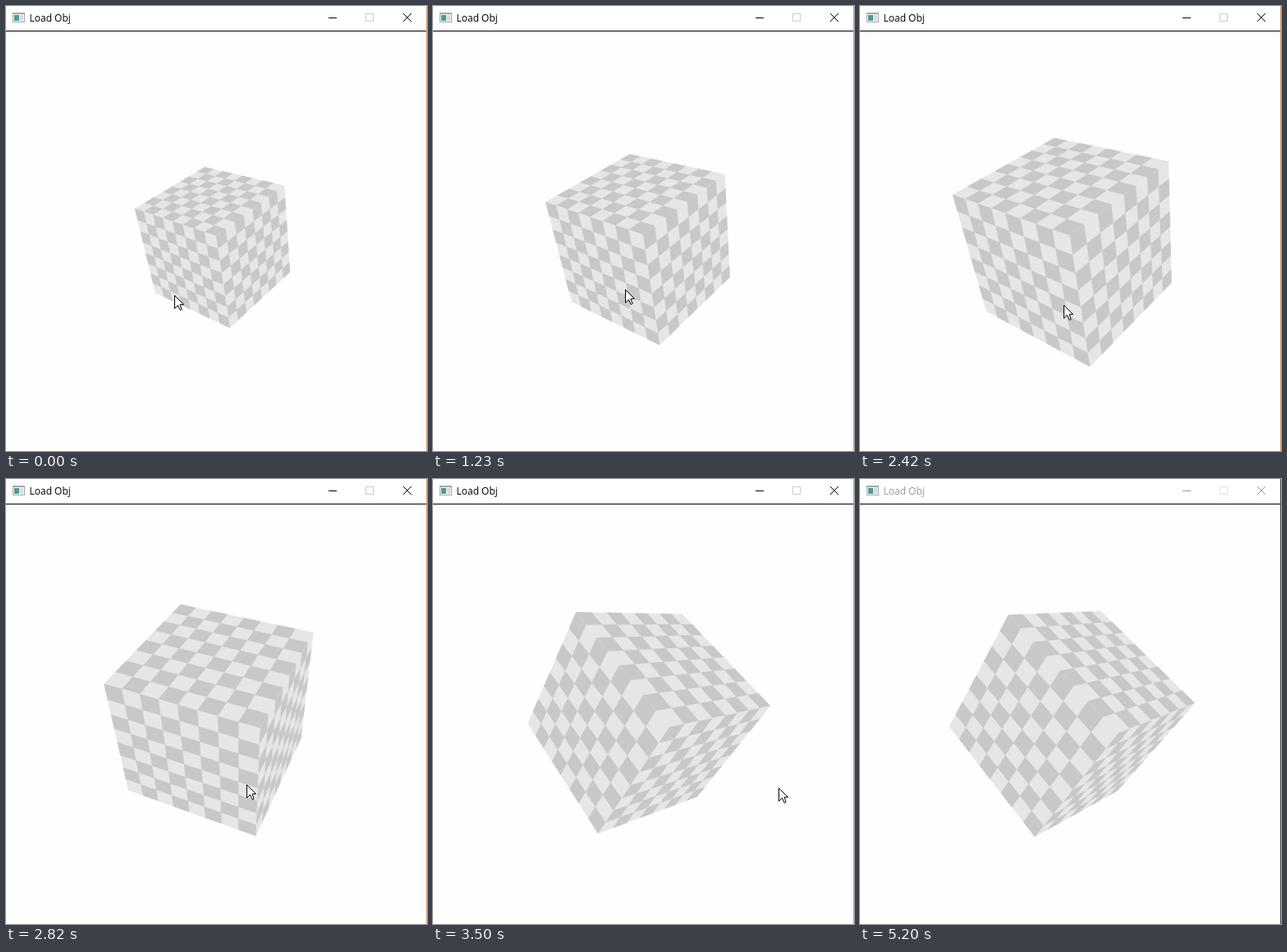
Animation of 513x542 px, one loop 5.3 s. Source, as an HTML page with a canvas:

```html
<!DOCTYPE html>
<html lang="en">
<head>
<meta charset="utf-8">
<title>Load Obj</title>
<style>
  html, body { margin: 0; width: 100%; height: 100%; overflow: hidden; background: #fefefe; }
  canvas { display: block; }
</style>
</head>
<body>
<canvas id="stage" width="513" height="542"></canvas>
<script>
const ctx = document.getElementById('stage').getContext('2d');
const LOOP = 5300, TICK = 134, INACTIVE = 5200;
const FOCAL = 256 / Math.tan(Math.PI / 8), CX = 256.5, CY = 287.5, CELLS = 8;
const LIGHT = '#e6e6e6', DARK = '#c8c8c8';

// Ticks at which the mouse wheel clicks; each click moves the camera closer
const wheel = [6, 6, 6, 7, 9, 10, 13, 13, 14, 14];
const distanceAt = tick => 10 * .9665 ** wheel.filter(click => click <= tick).length;

// Key poses of the drag: tick, then the cube's x and y axes in view space (y down, z away)
const poses = [
  [20, .758, .261, -.598, -.128, -.839, -.529],
  [23, .970, .072, .233, .215, -.715, -.666],
  [26, .712, -.126, .690, .431, -.700, -.570],
  [27, .605, -.181, .775, .487, -.688, -.540]
];

// Pointer path: tick, x, y
const path = [[1, 205, 352], [4, 234, 345], [15, 234, 345], [18, 248, 364], [22, 308, 375],
  [23, 372, 373], [26, 421, 376], [29, 421, 376], [31, 535, 658]];

const clamp = v => Math.min(1, Math.max(0, v));
const combine = (...terms) => [0, 1, 2].map(i => terms.reduce((sum, [k, v]) => sum + k * v[i], 0));
const dot = (a, b) => a[0] * b[0] + a[1] * b[1] + a[2] * b[2];
const unit = v => combine([1 / Math.hypot(...v), v]);
const cross = (a, b) => [a[1] * b[2] - a[2] * b[1], a[2] * b[0] - a[0] * b[2], a[0] * b[1] - a[1] * b[0]];

// Linear motion through key points, held before the first and after the last
function along(keys, tick) {
  const next = Math.max(1, keys.findIndex(key => key[0] > tick));
  const i = tick >= keys.at(-1)[0] ? keys.length - 1 : next;
  const [t0, ...from] = keys[i - 1], [t1, ...to] = keys[i];
  const k = clamp((tick - t0) / (t1 - t0));
  return from.map((v, n) => v + (to[n] - v) * k);
}

function axesAt(tick) {
  const pose = along(poses, tick);
  // The drag first tips the cube forward, then the tip fades into the turn
  const u = clamp((tick - 17) / 6), angle = .82 * u * u * (1 - u);
  const c = Math.cos(angle), s = Math.sin(angle);
  const tilt = ([x, y, z]) => [x, y * c - z * s, z * c + y * s];
  const x = tilt(unit(pose.slice(0, 3)));
  const rawY = tilt(pose.slice(3));
  const y = unit(combine([1, rawY], [-dot(x, rawY), x]));
  return { x, y, z: cross(x, y) };
}

function trace(points) {
  ctx.beginPath();
  points.forEach(p => ctx.lineTo(...p));
  ctx.closePath();
}

function drawFace(normal, a, b, parity, distance) {
  if (normal[2] > -1 / distance) return;
  const at = (i, j) => {
    const p = combine([1, normal], [2 * i / CELLS - 1, a], [2 * j / CELLS - 1, b]);
    const scale = FOCAL / (distance + p[2]);
    return [CX + p[0] * scale, CY + p[1] * scale];
  };
  const square = (i, j, n, color) => {
    trace([at(i, j), at(i + n, j), at(i + n, j + n), at(i, j + n)]);
    ctx.fillStyle = ctx.strokeStyle = color;
    ctx.lineWidth = .2;
    ctx.fill();
    ctx.stroke();
  };
  square(0, 0, CELLS, LIGHT);
  for (let i = 0; i < CELLS; i++)
    for (let j = 0; j < CELLS; j++)
      if ((i + j) % 2 === parity) square(i, j, 1, DARK);
}

function drawCube(tick) {
  const { x, y, z } = axesAt(tick), distance = distanceAt(tick);
  drawFace(y, x, z, 0, distance);
  drawFace(x, z, y, 0, distance);
  drawFace(z, x, y, 1, distance);
  drawFace(combine([-1, x]), z, y, 1, distance);
}

function box(color, x, y, w, h) {
  ctx.fillStyle = color;
  ctx.fillRect(x, y, w, h);
}

function drawWindow(active) {
  box('#fefefe', 0, 0, 513, 542);
  box('#fff', 0, 0, 512, 30);
  box('#000', 0, 30, 512, 1);
  box(active ? '#d3a27c' : '#4a4a4a', 512, 0, 1, 542);

  box('#a3a9ad', 8, 8, 15, 12);
  box('#f2f4f5', 9, 10, 13, 9);
  box('#4f9a94', 10, 11, 6, 7);
  box('#d5dcdf', 17, 11, 4, 7);

  const ink = active ? '#000' : '#999';
  ctx.fillStyle = ink;
  ctx.font = '12px "Open Sans", sans-serif';
  ctx.fillText('Load Obj', 28.5, 19);

  box(ink, 393, 14, 10, 1);
  ctx.lineWidth = 1;
  ctx.strokeStyle = active ? '#ccc' : '#e4e4e4';
  ctx.strokeRect(438.5, 9.5, 9, 9);
  ctx.strokeStyle = ink;
  ctx.beginPath();
  ctx.moveTo(484, 9);
  ctx.lineTo(494, 19);
  ctx.moveTo(494, 9);
  ctx.lineTo(484, 19);
  ctx.stroke();
}

function drawPointer(tick) {
  const [x, y] = along(path, tick).map(Math.round);
  const outline = [[0, 0], [0, 16], [4, 12], [6.7, 18], [8.7, 17], [6.5, 11.3], [11, 11]];
  trace(outline.map(([dx, dy]) => [x + dx + .5, y + dy + .5]));
  ctx.lineWidth = 1;
  ctx.fillStyle = '#fff';
  ctx.strokeStyle = '#000';
  ctx.fill();
  ctx.stroke();
}

function draw() {
  const t = performance.now() % LOOP;
  const tick = Math.floor((t + 20) / TICK);
  drawWindow(t < INACTIVE);
  drawCube(tick);
  drawPointer(tick);
  requestAnimationFrame(draw);
}
draw();
</script>
</body>
</html>
```
